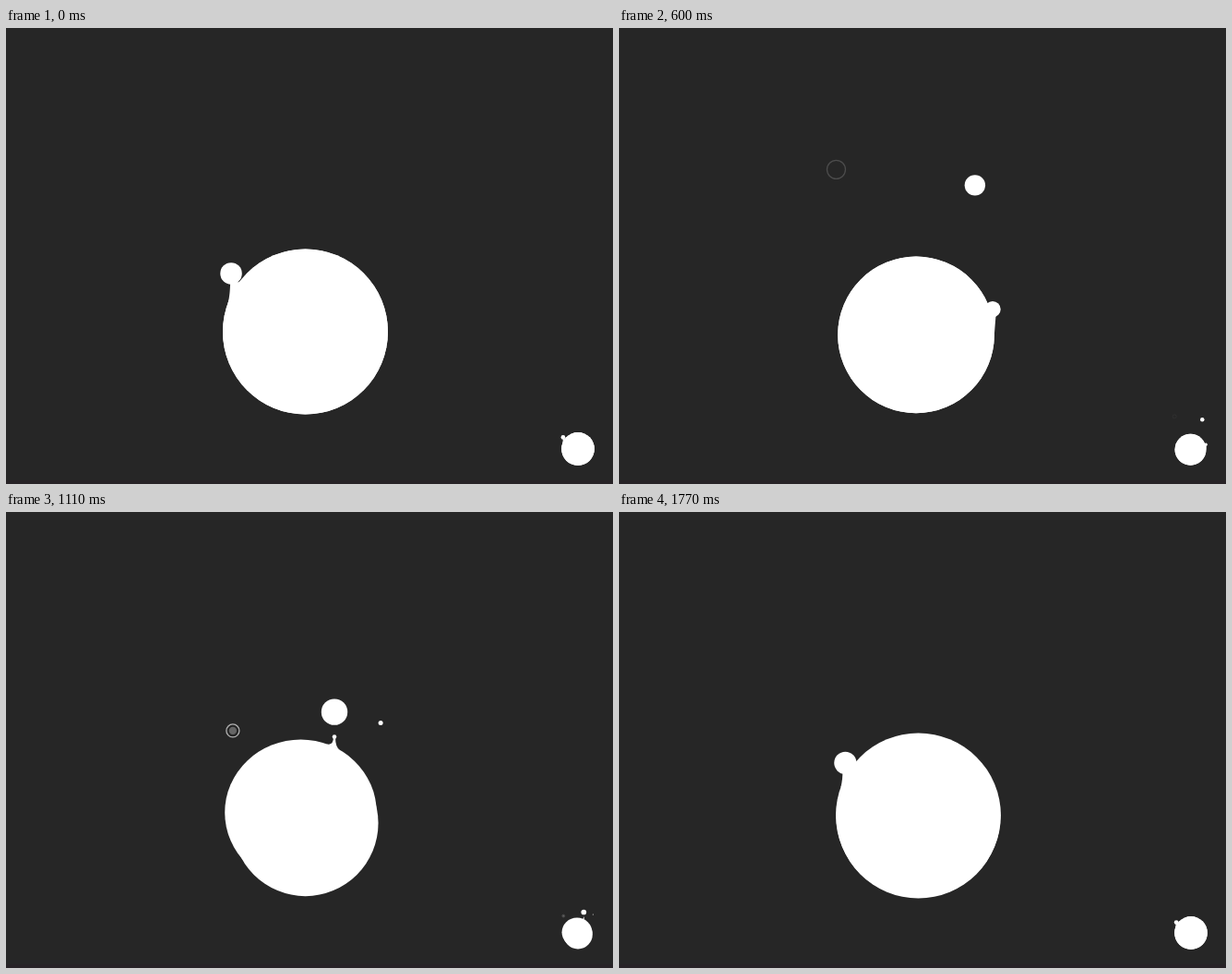
An HTML page with a canvas that plays this animation: 658x494 px, repeating every 1800 ms.

```html
<!DOCTYPE html>
<html lang="en">
<head>
<meta charset="utf-8">
<title>Bubbling blob</title>
<style>
  html, body { margin: 0; width: 100%; height: 100%; overflow: hidden; background: #262626; }
  canvas { display: block; }
</style>
</head>
<body>
<canvas id="stage" width="658" height="494"></canvas>
<script>
const LOOP = 1800, STEP = 30;
const POP = 170, GROW = 100;          // bubble bursting and swelling
const HOLD = 210, RETRACT = 110;      // stem stretching and falling back
const FLARE_OUT = 6, FLARE_IN = 10;   // stem foot, away from and towards the body centre
const ctx = document.getElementById('stage').getContext('2d');

// from / to: x, y, r. Rising slows with drag; a stem breaks at its snap time.
const bubbles = [
  { born: 1380, pop: 2260, from: [240, 351, 17], to: [237, 148, 4.5], drag: 0.08, sway: 9, ring: 10, stem: { x: 246, snap: 1890 } },
  { born: 0, pop: 870, from: [384, 320, 23], to: [387, 79, 4], drag: 0.18, ring: 10, stem: { x: 377, snap: 360 } },
  { born: 700, pop: 1600, from: [357, 341, 24], to: [355, 87, 4], drag: 0.45, ring: 10, stem: { x: 356, snap: 1080 } },
  { born: 420, pop: 1175, from: [404.5, 339, 11.5], to: [406.5, 204, 0.5], drag: 0.38, ring: 7, stem: { x: 405, snap: 760 } },
  { born: 600, pop: 1050, from: [250, 320, 8], to: [245, 219, 3.3], drag: 0, ring: 7, stem: { x: 248, snap: 990 } },
  { born: 1080, pop: 1120, from: [355, 258, 3.5], to: [355, 239, 1.5], drag: 0, ring: 4 }
];

const lerp = (a, b, p) => a + (b - a) * p;
const clamp = (v, lo, hi) => Math.min(hi, Math.max(lo, v));

function disc(x, y, rx, ry = rx) {
  ctx.beginPath();
  ctx.ellipse(x, y, rx, ry, 0, 0, Math.PI * 2);
  ctx.fill();
}

// Two lobes part and rejoin twice per loop: a quick swing, then a slow one
function bodyAt(t) {
  const quick = t < 600;
  const u = quick ? t / 600 : (t - 600) / 1200;
  const gap = (quick ? 19 : 13) * Math.sin(Math.PI * u);
  const tilt = 1.25 * (1 - u) ** 2;
  const dx = gap * Math.sin(tilt) / 2, dy = gap * Math.cos(tilt) / 2;

  const swell = Math.cos(Math.PI * t / LOOP) ** 8;
  const r = lerp(84.8, 89.5, swell);
  const cx = lerp(322, 324.5, swell);
  const bob = 2.6 * Math.cos(Math.PI * t / 300);
  const cy = lerp(329.8 + bob, 329, swell);

  const wide = r - dx, round = r - dy;
  return [
    [cx - dx, cy - dy, quick ? round : wide, round],
    [cx + dx, cy + dy, quick ? wide : round, round]
  ];
}

function bubbleAt({ born, pop, from, to, drag, sway = 0 }, t) {
  const p = (t - born) / (pop + POP - born);
  const eased = p + drag * p * (1 - p);
  const [x, y, r] = from.map((v, i) => lerp(v, to[i], eased));
  return [x + sway * Math.sin(2 * Math.PI * p), y, r * Math.min(1, (t - born) / GROW)];
}

// Nearest point of the body's top outline at a given x
function surface(body, x) {
  const left = Math.min(...body.map(e => e[0] - e[2]));
  const right = Math.max(...body.map(e => e[0] + e[2]));
  x = clamp(x, left, right);
  const tops = body.map(([cx, cy, rx, ry]) => {
    const d = 1 - ((x - cx) / rx) ** 2;
    return d >= -1e-9 ? cy - ry * Math.sqrt(Math.max(0, d)) : Infinity;
  });
  return [x, Math.min(...tops)];
}

function drawStem(body, bubble, t) {
  const { x, snap } = bubble.stem;
  if (t < snap - HOLD || t > snap + RETRACT) return;
  const root = surface(body, x)[1];
  const free = t > snap;
  let tip = bubbleAt(bubble, t)[1];
  if (free) {
    const [, y, r] = bubbleAt(bubble, snap);
    tip = lerp(y + r, root, (t - snap) / RETRACT);
  }
  if (tip > root) return;
  const half = 1 + 4 * clamp((snap - t) / HOLD, 0, 1);
  const onLeft = x < body[0][0];
  ctx.beginPath();
  ctx.moveTo(...surface(body, x - (onLeft ? FLARE_OUT : FLARE_IN)));
  ctx.quadraticCurveTo(...surface(body, x - half), x - half, tip);
  ctx.lineTo(x + half, tip);
  ctx.quadraticCurveTo(...surface(body, x + half), ...surface(body, x + (onLeft ? FLARE_IN : FLARE_OUT)));
  ctx.fill();
  if (free) disc(x, tip, 2.3);
}

function drawBubble(bubble, t) {
  const { born, pop, ring } = bubble;
  if (t < born || t >= pop + POP) return;
  const [x, y, r] = bubbleAt(bubble, t);
  const p = Math.max(0, (t - pop) / POP);
  ctx.globalAlpha = Math.max(0, 1 - p * 2);
  disc(x, y, r);
  if (p > 0) {
    ctx.globalAlpha = 1 - p;
    ctx.beginPath();
    ctx.arc(x, y, lerp(r, ring, Math.min(1, p * 3)), 0, Math.PI * 2);
    ctx.stroke();
  }
  ctx.globalAlpha = 1;
}

function drawScene(t) {
  const body = bodyAt(t);
  body.forEach(e => disc(...e));
  for (const b of bubbles) {
    for (const time of [t, t + LOOP]) {
      if (b.stem) drawStem(body, b, time);
      drawBubble(b, time);
    }
  }
}

function frame(now) {
  const t = Math.floor((now % LOOP) / STEP) * STEP;
  ctx.setTransform(1, 0, 0, 1, 0, 0);
  ctx.fillStyle = '#262626';
  ctx.fillRect(0, 0, 658, 494);
  ctx.fillStyle = '#272226';
  ctx.fillRect(0, 490, 658, 4);
  ctx.fillStyle = ctx.strokeStyle = '#fff';
  ctx.lineWidth = 1.3;
  drawScene(t);
  // Small copy in the corner
  ctx.setTransform(0.2, 0, 0, 0.2, 555.1, 390.2);
  drawScene(t);
}

let origin;
function tick(now) {
  origin ??= now;
  frame(now - origin);
  requestAnimationFrame(tick);
}
frame(0);
requestAnimationFrame(tick);
</script>
</body>
</html>
```
